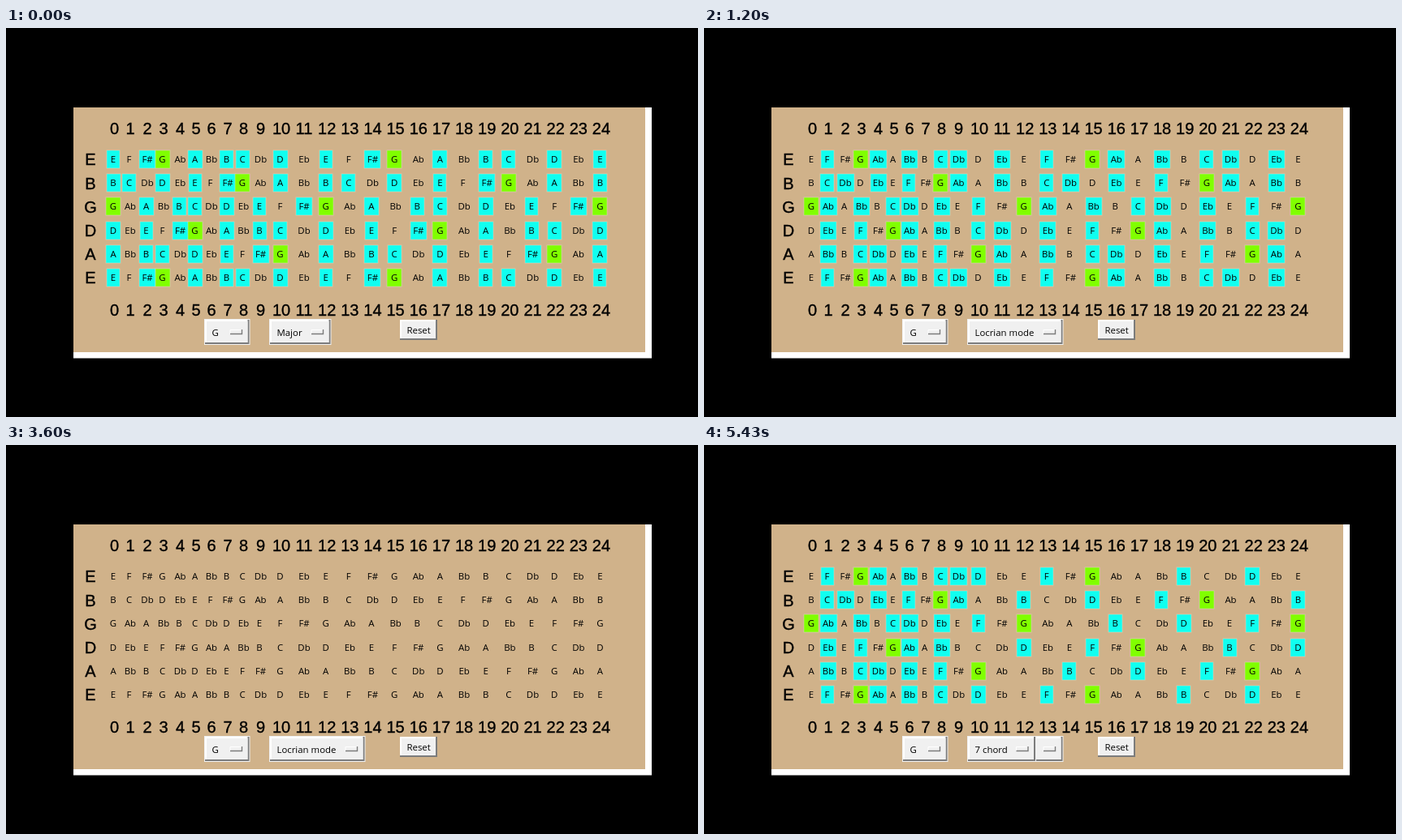
Recreate the animation shown at these times as an HTML page. Size 852 px wide and 480 px high, loop 5460 ms.

```html
<!DOCTYPE html>
<html lang="en">
<head>
<meta charset="utf-8">
<title>Fretboard scales</title>
<style>
  html, body { margin: 0; width: 100%; height: 100%; overflow: hidden; background: #000; }
  svg { display: block; width: 100vw; height: 100vh; }
  .big { font: 20px "Liberation Sans", Arial, sans-serif; text-anchor: middle;
    stroke: #000; stroke-width: .35px; }
  .note { font: 11.4px "Open Sans", "Noto Sans", sans-serif; text-anchor: middle; }
  .label { font: 11.4px "Open Sans", "Noto Sans", sans-serif; }
</style>
</head>
<body>
<svg id="stage" viewBox="0 0 852 480"></svg>
<script>
const LOOP = 5460;
const NAMES = ['C', 'Db', 'D', 'Eb', 'E', 'F', 'F#', 'G', 'Ab', 'A', 'Bb', 'B'];
const STRINGS = ['E', 'B', 'G', 'D', 'A', 'E'];
const FRET_X = [133.5, 153, 174, 194, 214.5, 234, 253, 273, 292.5, 313.5, 339];
for (let fret = 11; fret <= 24; fret++) FRET_X.push(367 + (fret - 11) * 28.15);
const CELL_WIDTH = { E: 16, F: 16, C: 17, B: 17, A: 18, D: 18, G: 18,
  'F#': 20, Eb: 20, Bb: 20, Ab: 21, Db: 21 };

const WOOD = '#d0b28a', FACE = '#f0f0f0', LIGHT = '#fff', SHADOW = '#7c7c7c';
const ROOT_FILL = '#80ff00', NOTE_FILL = '#10fff0';

const ROOT = 'G';
const MAJOR = ['G', 'A', 'B', 'C', 'D', 'E', 'F#'];
const LOCRIAN = ['G', 'Ab', 'Bb', 'C', 'Db', 'Eb', 'F'];
const SEVENTH = ['G', 'B', 'D', 'F'];

// Repaints run right to left, bottom string first; `cells` is how far one got.
const ALL = 25 * STRINGS.length;
const REPAINTS = [
  { at: 0, notes: MAJOR, cells: ALL },
  { at: 1200, notes: LOCRIAN, cells: ALL },
  { at: 2200, notes: [], cells: 36 },
  { at: 2230, notes: [], cells: ALL },
  { at: 4200, notes: LOCRIAN, cells: ALL },
  { at: 5430, notes: SEVENTH, cells: 91 }
];
const LOCRIAN_CHOSEN = 1000, SEVENTH_CHOSEN = 5230;
const RESET_DOWN = 2030, RESET_UP = 2130;

const stage = document.getElementById('stage');

function add(parent, tag, attrs, text) {
  const node = document.createElementNS('http://www.w3.org/2000/svg', tag);
  for (const key in attrs) node.setAttribute(key, attrs[key]);
  if (text !== undefined) node.textContent = text;
  parent.appendChild(node);
  return node;
}

const rect = (parent, x, y, width, height, fill) =>
  add(parent, 'rect', { x, y, width, height, fill });

const write = (parent, kind, x, y, text) =>
  add(parent, 'text', { class: kind, x, y }, text);

function bevel(parent, x, y, width, height, sunken) {
  const [light, dark] = sunken ? [SHADOW, LIGHT] : [LIGHT, SHADOW];
  rect(parent, x, y, width, height, dark);
  rect(parent, x, y, width - 2, height - 2, light);
  rect(parent, x + 2, y + 2, width - 4, height - 4, FACE);
}

function menu(x, width, text) {
  const y = 360, height = 30, right = x + width - 8.5, top = y + 12;
  const group = add(stage, 'g', {});
  rect(group, x - 1, y - 1, width + 2, height + 2, FACE);
  bevel(group, x, y, width, height);
  write(group, 'label', x + 8.5, y + 20, text);
  add(group, 'path', { d: `M${right - 15} ${top + 5.5}V${top + .5}H${right - 1}`,
    fill: 'none', stroke: LIGHT });
  add(group, 'path', { d: `M${right - 15} ${top + 5.5}H${right - .5}V${top}`,
    fill: 'none', stroke: SHADOW, 'stroke-width': 1.4 });
  return group;
}

function resetButton(sunken) {
  const group = add(stage, 'g', {});
  bevel(group, 485, 360, 46, 25, sunken);
  write(group, 'label', 493.5, 377, 'Reset');
  return group;
}

rect(stage, 0, 0, 852, 480, '#000');
rect(stage, 83, 98, 712, 309.5, '#fff');
rect(stage, 83, 98, 704, 302, WOOD);

FRET_X.forEach((x, fret) => {
  write(stage, 'big', x, 131, fret);
  write(stage, 'big', x, 355, fret);
});

const cells = [];
STRINGS.forEach((open, row) => {
  const y = 162 + row * 29.2;
  write(stage, 'big', 104, y + 7.3, open);
  FRET_X.forEach((fretX, fret) => {
    const name = NAMES[(NAMES.indexOf(open) + fret) % 12];
    const x = fretX - (name.length === 1 ? 1.5 : 0);
    const width = CELL_WIDTH[name];
    const box = rect(stage, Math.round(x - width / 2), Math.round(y - 11), width, 22,
      name === ROOT ? ROOT_FILL : NOTE_FILL);
    box.setAttribute('stroke', '#dcdcc0');
    box.setAttribute('stroke-opacity', .5);
    write(stage, 'note', x, y + 4, name);
    cells.push({ name, box, order: (24 - fret) * STRINGS.length + STRINGS.length - 1 - row });
  });
});

menu(245, 54.5, 'G');
const majorMenu = menu(325, 74.5, 'Major');
const locrianMenu = menu(325, 116.5, 'Locrian mode');
const seventhMenu = menu(325, 83, '7 chord');
const resetUp = resetButton(false);
const resetDown = resetButton(true);

const show = (node, visible) => node.setAttribute('visibility', visible ? 'visible' : 'hidden');

function draw(time) {
  const past = REPAINTS.filter(paint => paint.at <= time).reverse();
  for (const cell of cells) {
    const paint = past.find(p => cell.order < p.cells);
    show(cell.box, paint.notes.includes(cell.name));
  }
  show(majorMenu, time < LOCRIAN_CHOSEN);
  // The wider menu stays behind the narrower one: its right end is never cleared.
  show(locrianMenu, time >= LOCRIAN_CHOSEN);
  show(seventhMenu, time >= SEVENTH_CHOSEN);
  const pressed = time >= RESET_DOWN && time < RESET_UP;
  show(resetUp, !pressed);
  show(resetDown, pressed);
}

const start = performance.now();
function tick() {
  draw((performance.now() - start) % LOOP);
  requestAnimationFrame(tick);
}
draw(0);
requestAnimationFrame(tick);
</script>
</body>
</html>
```
